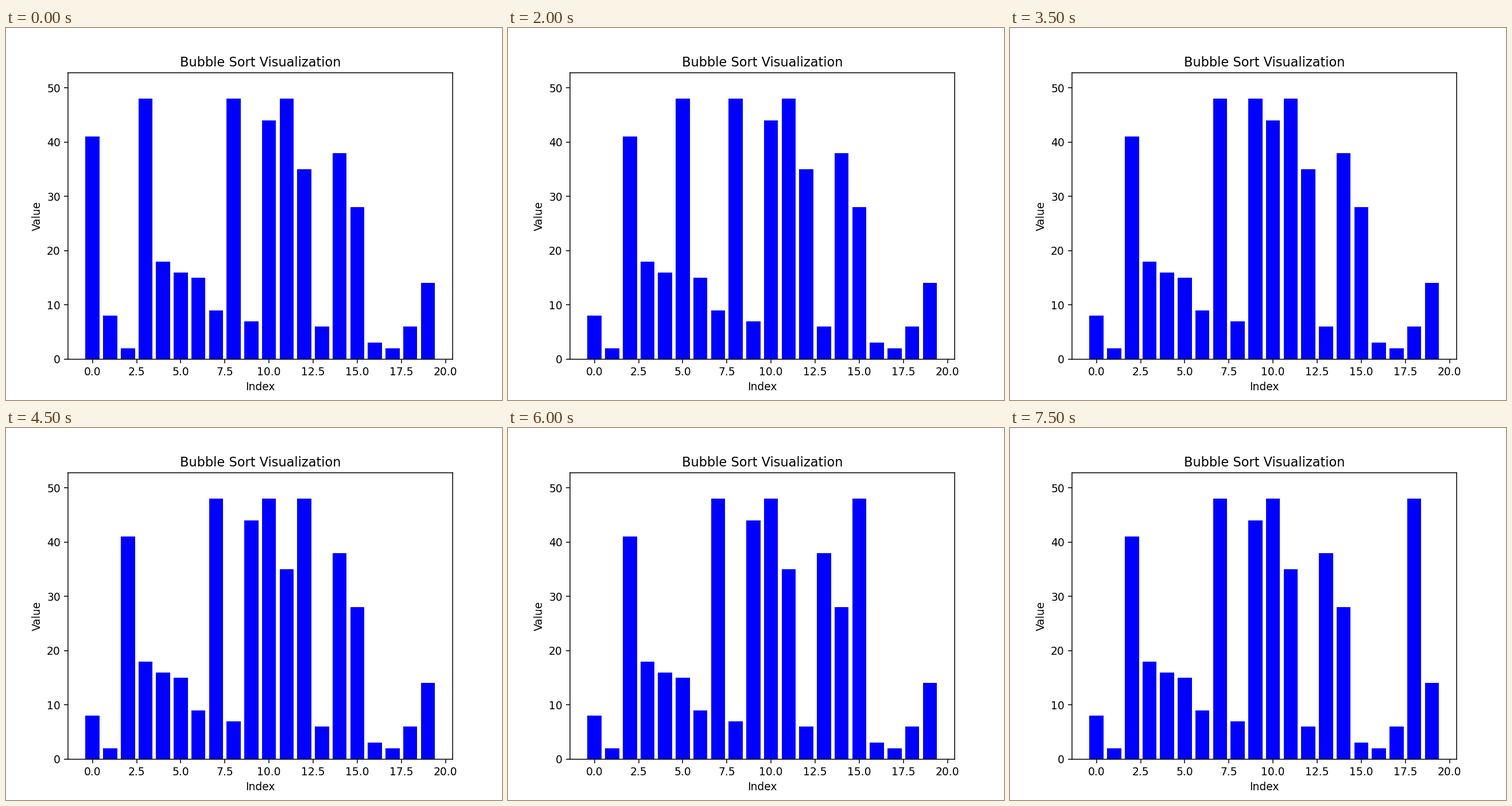
These frames come from a looping animation (864 by 648 pixels, 8 s). A matplotlib script:

```python
import matplotlib.pyplot as plt
from matplotlib.animation import FuncAnimation

VALUES = [41, 8, 2, 48, 18, 16, 15, 9, 48, 7,
          44, 48, 35, 6, 38, 28, 3, 2, 6, 14]
FRAMES = 16
INTERVAL = 500  # ms


def bubble_states(values):
    """Yield the start order, then the order after every swap."""
    a = list(values)
    yield a[:]
    for end in range(len(a) - 1, 0, -1):
        for j in range(end):
            if a[j] > a[j + 1]:
                a[j], a[j + 1] = a[j + 1], a[j]
                yield a[:]


states = [s for _, s in zip(range(FRAMES), bubble_states(VALUES))]

plt.rcParams["font.family"] = "DejaVu Sans"
fig, ax = plt.subplots(figsize=(6.4, 4.8), dpi=135)
bars = ax.bar(range(len(VALUES)), VALUES, color="blue")
ax.set_ylim(0, max(VALUES) * 1.1)
ax.set_title("Bubble Sort Visualization")
ax.set_xlabel("Index")
ax.set_ylabel("Value")


def update(i):
    for bar, height in zip(bars, states[i]):
        bar.set_height(height)
    return list(bars)


anim = FuncAnimation(fig, update, frames=FRAMES, interval=INTERVAL,
                     repeat=True, repeat_delay=0, blit=False)
plt.show()
```
